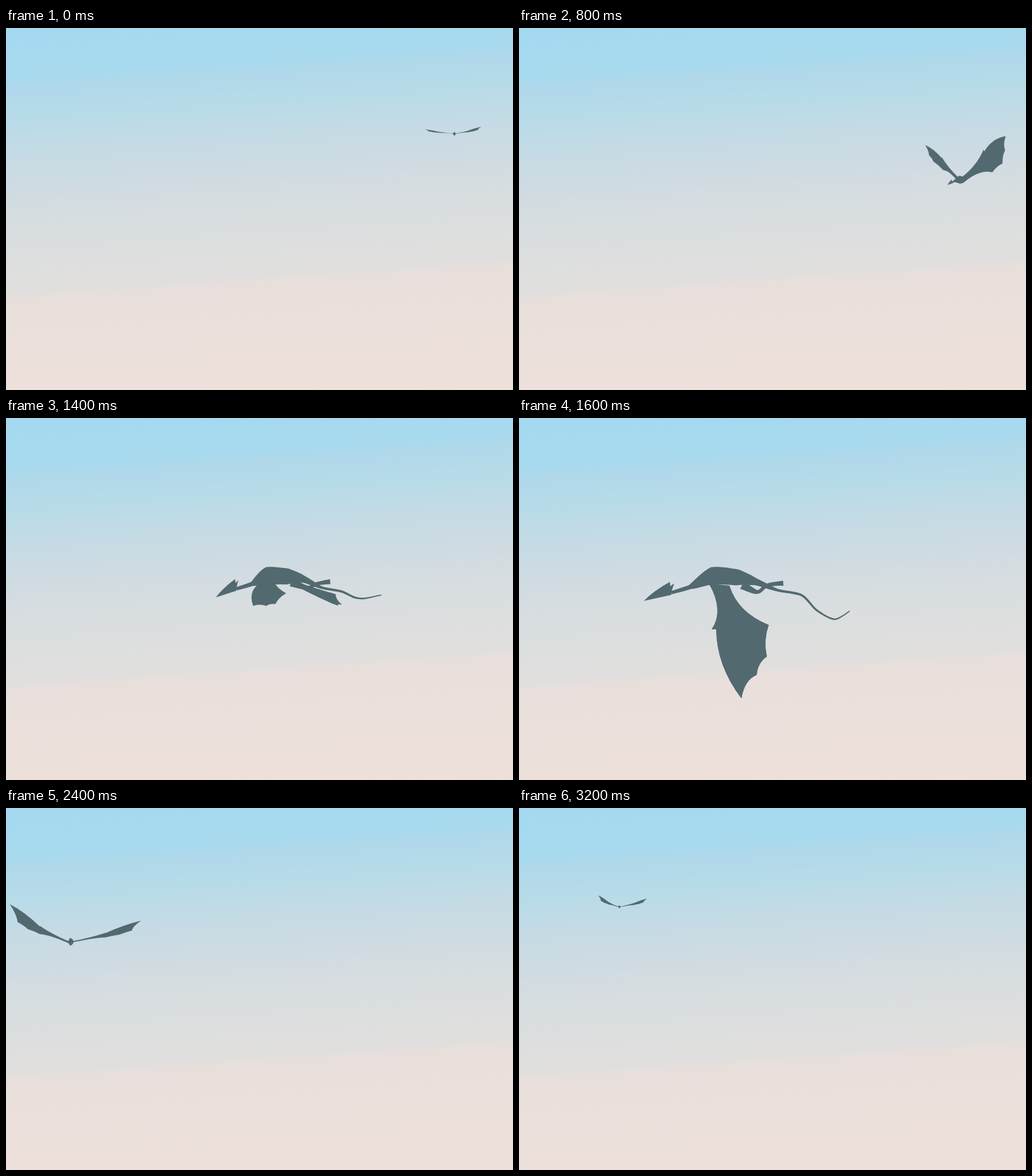
An HTML page for the animation above (3400 ms loop, 800 px wide and 572 px high).

```html
<!DOCTYPE html>
<html lang="en">
<head>
<meta charset="utf-8">
<title>Dragon in flight</title>
<style>
  html, body { margin: 0; width: 100%; height: 100%; overflow: hidden; }
  body {
    background: linear-gradient(176deg,
      #a4d9f0 0%, #a8daee 13%, #b0d8eb 15%, #b7dbe8 23%, #c5dbe5 32%,
      #cedbe2 40%, #d6dde0 48%, #e1dfdd 67%, #e8dfdc 69%,
      #ebe0db 79%, #eee0d9 100%);
  }
  svg { display: block; width: 800px; height: 572px; }
</style>
</head>
<body>
<svg viewBox="0 0 800 572" fill="#526970">
  <path id="left"/>
  <path id="right"/>
  <path id="spine"/>
  <path id="leg"/>
  <path id="head"/>
</svg>
<script>
const STEP = 200, LOOP = 3400;

// Blends numbers, points, lists of points or whole poses.
function mix(a, b, u) {
  if (typeof a === 'number') return a + (b - a) * u;
  if (Array.isArray(a)) return a.map((v, i) => mix(v, b[i], u));
  return Object.fromEntries(Object.keys(a).map(k => [k, mix(a[k], b[k], u)]));
}

const pts = text => text.split(' ').map(p => p.split(',').map(Number));
const stack = (point, count) => Array(count).fill(point);

// Wing: root, thumb, tip, three finger ends, armpit.
// Spine: nape, neck, shoulder, belly, rump, then five points of the tail.
// Head: beak, crest. Leg: hip, knee, ankle, toe.
const turning = {
  left: pts('693,236 667,204 641,185 647,201 654,211 670,225 690,239'),
  right: pts('697,237 733,192 768,171 767,193 763,214 747,228 702,244'),
  spine: [...pts('682,245 687,242 695,240 699,241'), ...stack([702, 243], 6)],
  head: pts('676,248 683,239'),
  leg: stack([696, 244], 4),
  size: 0.45
};
const raised = {
  left: pts('520,238 480,193 429,151 447,188 459,211 490,227 515,241'),
  right: pts('540,238 587,186 684,146 674,188 669,213 647,230 562,244'),
  spine: pts('486,264 507,257 520,250 545,249 566,251 588,264 612,268 630,263 634,252 663,254'),
  head: pts('465,278 485,250'),
  leg: pts('548,255 575,262 588,260 606,256'),
  size: 1
};
const down = pts('300,262 304,334 351,443 375,406 391,377 394,327 332,265');
const lowered = {
  left: down,
  right: down,
  spine: pts('240,276 270,267 306,250 345,252 374,259 408,272 446,280 470,304 498,318 522,305'),
  head: pts('197,289 238,259'),
  leg: pts('352,264 376,275 392,264 417,261'),
  size: 1
};
const spread = {
  left: pts('145,275 72,243 5,221 27,252 61,271 92,278 145,280'),
  right: pts('160,276 229,233 282,205 278,223 265,249 229,274 168,281'),
  spine: pts('124,281 138,285 150,281 163,283 176,287 195,290 218,299 218,318 247,322 261,332'),
  head: pts('106,287 125,277'),
  leg: pts('165,286 172,290 182,290 194,289'),
  size: 0.65
};

// Head-on glide, built from the two wing tips relative to the body.
function glide([x, y], leftTip, rightTip, size) {
  const wing = ([dx, dy]) => [
    [0, -0.01], [0.5, 0.42], [1, 1], [0.87, 0.52], [0.7, 0.33], [0.5, 0.2], [0, -0.06]
  ].map(([u, v]) => [x + dx * u, y + dy * v]);
  const middle = [x, y + size];
  return {
    left: wing(leftTip),
    right: wing(rightTip),
    spine: Array.from({ length: 10 }, (_, i) => [x + (Math.min(i, 4) - 2) * 6 * size, middle[1]]),
    head: stack(middle, 2),
    leg: stack(middle, 4),
    size
  };
}

// Stretches the wings about the shoulder.
function flap(pose, reach, lift) {
  const [cx, cy] = pose.spine[2];
  const wing = list => list.map(([x, y]) => [cx + (x - cx) * reach, cy + (y - cy) * lift]);
  return { ...pose, left: wing(pose.left), right: wing(pose.right) };
}

const easeOut = u => 1 - (1 - u) ** 1.5;
const keys = [
  { at: 0, pose: glide([707, 167], [-46, -7], [43, -11], 0.2) },
  { at: 400, pose: glide([701, 192], [-61, -17], [59, -21], 0.26) },
  { at: 800, pose: turning },
  { at: 1000, pose: flap(mix(turning, raised, 0.5), 0.69, 1.47) },
  { at: 1200, pose: raised },
  { at: 1600, pose: lowered },
  { at: 2000, pose: spread },
  { at: 2400, pose: glide([101, 211], [-95, -59], [112, -33], 0.42), ease: easeOut },
  { at: 3200, pose: glide([158, 156], [-33, -18], [44, -13], 0.16) }
];

function poseAt(time) {
  const next = keys.findIndex(k => k.at > time);
  if (next < 0) return keys[keys.length - 1].pose;
  const a = keys[next - 1], b = keys[next];
  const u = (time - a.at) / (b.at - a.at);
  return mix(a.pose, b.pose, a.ease ? a.ease(u) : u);
}

const xy = p => p.map(v => v.toFixed(2)).join();
const curve = (control, end) => `Q${xy(control)} ${xy(end)}`;

function wingPath([root, thumb, tip, f1, f2, f3, armpit]) {
  const bend = (a, b, toward, k) => curve(mix(mix(a, b, 0.5), toward, k), b);
  return `M${xy(root)}` + bend(root, thumb, f3, 0.24) +
    `L${xy(mix(thumb, f3, 0.08))}` + bend(thumb, tip, f2, -0.25) +
    bend(tip, f1, thumb, 0.12) + bend(f1, f2, thumb, 0.08) +
    bend(f2, f3, thumb, 0.08) + bend(f3, armpit, thumb, 0.3) + 'Z';
}

function headPath([beak, crest], nape) {
  const notch = mix(crest, nape, 0.4);
  const horn = notch.map((v, i) => v + (crest[i] - beak[i]) * 0.15);
  const jaw = mix(crest, nape, 1.2);
  return `M${xy(beak)}` + curve(mix(nape, mix(beak, crest, 0.5), 1.25), crest) +
    [notch, horn, nape, jaw].map(p => `L${xy(p)}`).join('') + 'Z';
}

// Smooth ribbon through the points, with a width at each of them.
function ribbonPath(list, widths, size) {
  const dots = [], last = list.length - 1;
  const point = i => list[Math.max(0, Math.min(last, i))];
  for (let s = 0; s <= last; s += 0.125) {
    const i = Math.min(last - 1, Math.floor(s)), t = s - i;
    const [p, a, b, n] = [-1, 0, 1, 2].map(k => point(i + k));
    const at = a.map((v, k) => v * (1 + t * t * (2 * t - 3)) + b[k] * t * t * (3 - 2 * t) +
      0.4 * (t * (1 - t) ** 2 * (b[k] - p[k]) - t * t * (1 - t) * (n[k] - v)));
    dots.push({ at, half: mix(widths[i], widths[i + 1], t) * size / 2 });
  }
  const side = sign => dots.map(({ at, half }, i) => {
    const a = dots[Math.max(0, i - 1)].at, b = dots[Math.min(dots.length - 1, i + 1)].at;
    const dx = b[0] - a[0], dy = b[1] - a[1], k = sign * half / (Math.hypot(dx, dy) || 1);
    return [at[0] - dy * k, at[1] + dx * k];
  });
  return 'M' + [...side(1), ...side(-1).reverse()].map(xy).join('L') + 'Z';
}

const spineWidths = [5, 7, 29, 25, 11, 4, 3.6, 3, 2.4, 1.4];
const legWidths = [14, 6, 5, 8];
const setPath = (id, d) => document.getElementById(id).setAttribute('d', d);

function draw(time) {
  const pose = poseAt(Math.floor(time % LOOP / STEP) * STEP);
  setPath('left', wingPath(pose.left));
  setPath('right', wingPath(pose.right));
  setPath('spine', ribbonPath(pose.spine, spineWidths, pose.size));
  setPath('leg', ribbonPath(pose.leg, legWidths, pose.size));
  setPath('head', headPath(pose.head, pose.spine[0]));
}

const start = performance.now();
function tick() {
  draw(performance.now() - start);
  requestAnimationFrame(tick);
}
tick();
</script>
</body>
</html>
```
